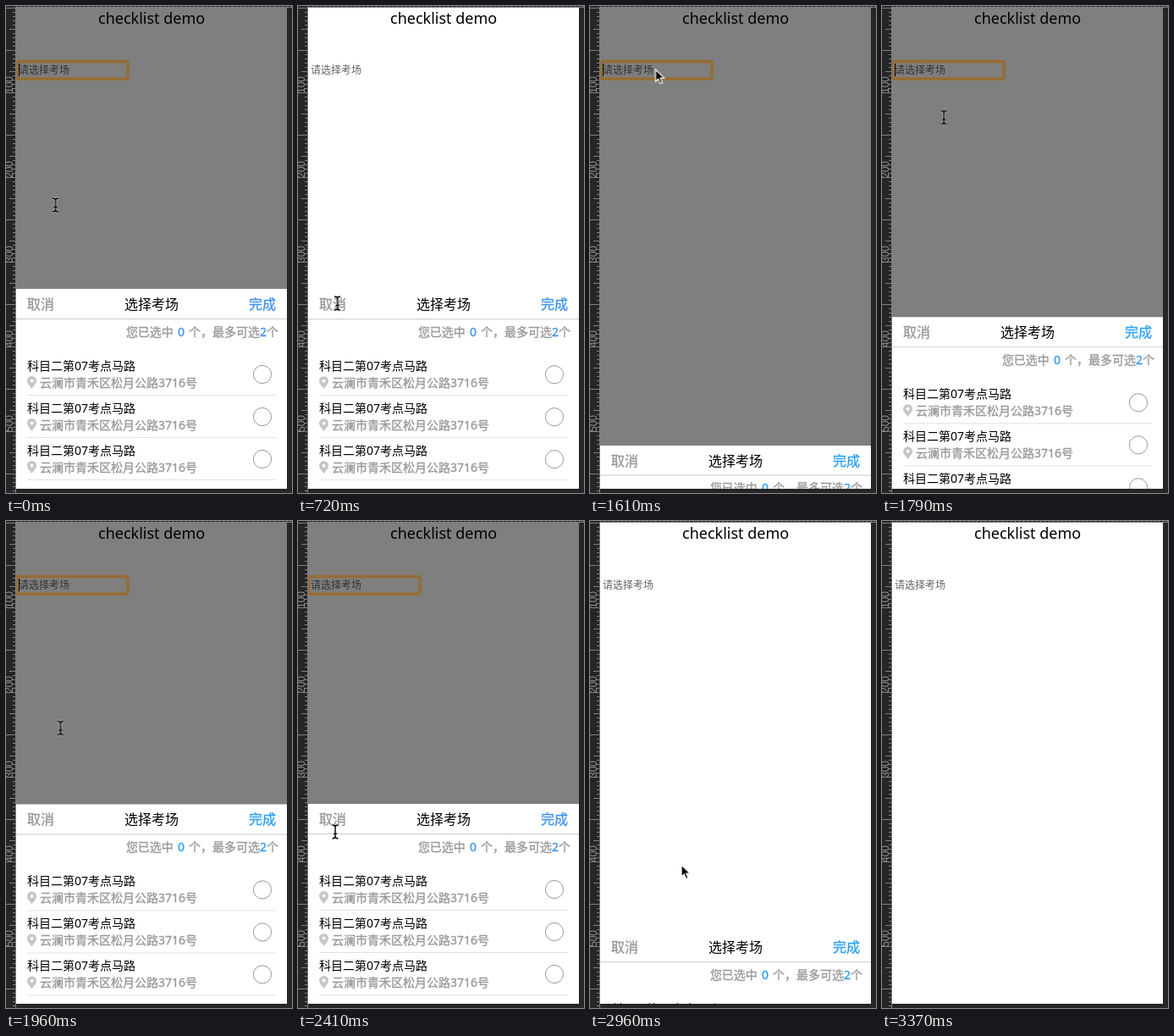
An HTML page that plays this animation: 338x575 px, repeating every 3.65 s.

```html
<!DOCTYPE html>
<html lang="zh-CN">
<head>
<meta charset="utf-8">
<title>checklist demo</title>
<style>
  html, body { margin: 0; width: 100%; height: 100%; overflow: hidden; background: #262626; }
  svg { display: block; width: 338px; height: 575px; }
  text { font: 14px "Noto Sans", "Noto Sans CJK SC", "Noto Sans CJK", sans-serif; }
  .title { font-size: 18px; }
  .input { font-size: 12px; fill: #666; }
  .head { font-size: 16px; }
  .grey, .blue { fill: currentColor; stroke: currentColor; stroke-width: .35px; }
  .grey { color: #999; }
  .blue { color: #4395ec; }
  .info { word-spacing: 1.4px; }
  #ruler text { font: 12px "Liberation Sans", Arial, sans-serif; fill: #909090; }

  /* One loop is 3650 ms; 1% = 36.5 ms */
  .focus, .caret, .ibeam, .arrow, .panel, .blue { animation: 3650ms step-end infinite; }
  .focus { animation-name: focus; }
  .caret { animation-name: caret; }
  .ibeam { animation-name: ibeam; }
  .arrow { animation-name: arrow; }
  .panel { animation-name: panel; }
  .blue { animation-name: tint; }
  .slide { animation: slide 3650ms linear infinite; }
  .cursor { animation: move 3650ms linear infinite; }

  @keyframes focus {
    0%, 44.109% { visibility: visible; }
    19.726%, 76.438%, 100% { visibility: hidden; }
  }
  @keyframes caret {
    0%, 44.109% { visibility: visible; }
    6.027%, 62.74%, 100% { visibility: hidden; }
  }
  @keyframes panel {
    0%, 44.109% { visibility: visible; }
    33.425%, 90.137%, 100% { visibility: hidden; }
  }
  @keyframes tint {
    0%, 58.082%, 76.438% { color: #4395ec; }
    20.3%, 44.109%, 77%, 100% { color: #2ea2f1; }
  }
  @keyframes slide {
    0% { transform: translateY(0); }
    19.726% { transform: translateY(0); animation-timing-function: ease; }
    32.329% { transform: translateY(236px); }
    42.09% { transform: translateY(236px); animation-timing-function: ease; }
    54.466% { transform: translateY(0); }
    76.438% { transform: translateY(0); animation-timing-function: ease; }
    89.041%, 100% { transform: translateY(236px); }
  }
  @keyframes ibeam {
    0%, 45.479% { visibility: visible; }
    20.822%, 77.534%, 100% { visibility: hidden; }
  }
  @keyframes arrow {
    0%, 45.479%, 92.328%, 100% { visibility: hidden; }
    20.822%, 77.534% { visibility: visible; }
  }
  @keyframes move {
    0% { transform: translate(58.5px, 235px); animation-timing-function: step-end; }
    .822% { transform: translate(58.5px, 236px); }
    5.753% { transform: translate(58.5px, 236px); animation-timing-function: ease-in-out; }
    14.247% { transform: translate(46.5px, 351px); }
    19.726% { transform: translate(46.5px, 351px); animation-timing-function: ease-in; }
    26.027% { transform: translate(82px, 299px); }
    33.425%, 34.247% { transform: translate(90px, 125px); animation-timing-function: ease-out; }
    37.534% { transform: translate(77.5px, 75px); }
    44.109% { transform: translate(77.5px, 75px); animation-timing-function: ease-in; }
    53.699% { transform: translate(64.5px, 244px); }
    58.082%, 58.904% { transform: translate(49px, 308px); animation-timing-function: ease-out; }
    65.753% { transform: translate(44px, 367px); animation-timing-function: ease-in-out; }
    69.315% { transform: translate(42.5px, 357px); }
    76.438% { transform: translate(42.5px, 357px); animation-timing-function: ease-in-out; }
    90.137% { transform: translate(311px, 558px); animation-timing-function: step-end; }
    90.959% { transform: translate(313px, 561px); animation-timing-function: step-end; }
    91.644%, 100% { transform: translate(316px, 568px); }
  }
</style>
</head>
<body>
<svg viewBox="0 0 338 575">
  <defs>
    <clipPath id="page"><rect x="12" y="2" width="320" height="568"/></clipPath>
    <g id="row">
      <text x="25" y="430">科目二第07考点马路</text>
      <path d="M30.5 437a5.5 5.5 0 0 0-5.5 5.5c0 3.5 3.5 6 5.5 9.7c2-3.7 5.5-6.2 5.5-9.7a5.5 5.5 0 0 0-5.5-5.5z" fill="#c6c6c6"/>
      <circle cx="30.5" cy="442.5" r="2" fill="#fff"/>
      <text class="grey" x="40" y="449.5">云澜市青禾区松月公路3716号</text>
      <circle cx="303" cy="435" r="10.6" fill="none" stroke="#999"/>
      <path d="M25 459.5H319" stroke="#e2e2e2"/>
    </g>
    <rect id="ring" x="12.5" y="65.5" width="131.5" height="20.5" rx="2" fill="none"/>
    <path id="beam" d="M-3.5-8Q0-8 0-5.5Q0-8 3.5-8M0-6V6M-3.5 8Q0 8 0 5.5Q0 8 3.5 8M-2 2.5H2" fill="none"/>
  </defs>

  <rect width="338" height="575" fill="#262626"/>
  <g id="ruler"></g>
  <rect x="12" y="2" width="320" height="568" fill="#fff"/>

  <g clip-path="url(#page)">
    <text class="title" x="109" y="21">checklist demo</text>
    <text class="input" x="15" y="80">请选择考场</text>
    <g class="focus">
      <rect x="12" y="2" width="320" height="568" fill="#000" opacity=".5"/>
      <use href="#ring" stroke="#95703f" stroke-width="4.4" opacity=".6"/>
      <use href="#ring" stroke="#976b31" stroke-width="2.4"/>
    </g>
    <path class="caret" d="M15.5 68V83" stroke="#000"/>

    <g class="panel">
      <g class="slide">
        <rect x="12" y="334" width="320" height="236" fill="#fff"/>
        <path d="M12 369.5H332" stroke="#ccc"/>
        <text class="head grey" x="25" y="358">取消</text>
        <text class="head" x="140" y="358">选择考场</text>
        <text class="head blue" x="287" y="358">完成</text>
        <text class="info grey" x="322" y="389.5" text-anchor="end">您已选中 <tspan class="blue">0</tspan> 个，最多可选<tspan class="blue">2</tspan>个</text>
        <use href="#row"/>
        <use href="#row" y="50"/>
        <use href="#row" y="100"/>
      </g>
    </g>
  </g>

  <g class="cursor">
    <g class="ibeam">
      <use href="#beam" stroke="#fff" stroke-width="2.8" opacity=".6"/>
      <use href="#beam" stroke="#000" stroke-width="1.4"/>
    </g>
    <path class="arrow" d="M0 0V14L3.2 11L5.5 16.5L8 15.4L5.700 10.200H10.200Z" fill="#000" stroke="#fff" stroke-width="1.200"/>
  </g>
</svg>
<script>
  // Ruler: edge lines, ticks every 5px, longer at 25 and 50, a label every 100
  let ticks = 'M11.5 1V575M11 1.5H338', labels = '';
  for (let n = 0; n <= 570; n += 5) {
    const len = n % 50 === 0 ? 11 : n % 25 === 0 ? 7 : 3;
    ticks += `M${11 - len} ${n + 2.5}H11`;
    if (n && n % 100 === 0) labels += `<text transform="translate(8 ${n + 3}) rotate(-90)">${n}</text>`;
  }
  for (let x = 12.5; x < 338; x += 5) ticks += `M${x} 0V1`;
  document.getElementById('ruler').innerHTML = `<path d="${ticks}" stroke="#808080"/>${labels}`;
</script>
</body>
</html>
```
